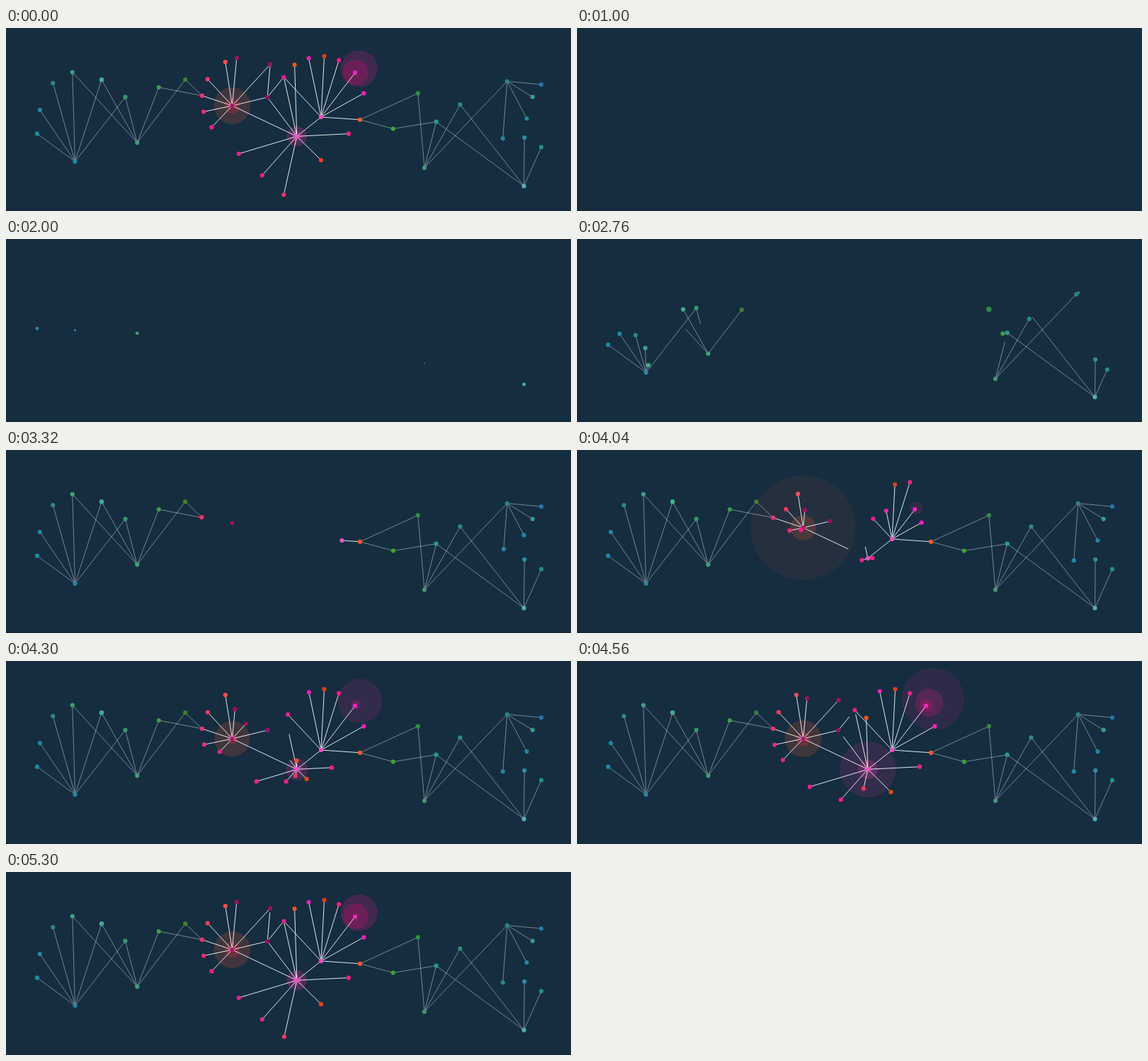
Write an HTML page with a canvas that moves like this. It is 798 px wide and 259 px high and loops after 5320 ms.

```html
<!DOCTYPE html>
<html lang="en">
<head>
<meta charset="utf-8">
<title>Growing network</title>
<style>
html, body { margin: 0; width: 100%; height: 100%; overflow: hidden; background: #152d3f; }
canvas { display: block; }
</style>
</head>
<body>
<canvas id="stage" width="798" height="259"></canvas>
<script>
const ctx = document.getElementById('stage').getContext('2d');
const LOOP = 5320, HOLD_END = 1000, GROW_START = 2000, STEP = 20;
const DOT = 3.1;
const FAINT = 'rgba(255,255,255,.42)', BRIGHT = 'rgba(255,255,255,.88)';

const clamp = v => Math.max(0, Math.min(1, v));
const smooth = p => p * p * (3 - 2 * p);
const easeOut = p => 1 - (1 - p) ** 2;
const bounce = p => 1 + 4.2 * (p - 1) ** 3 + 3.2 * (p - 1) ** 2;
const lerp = (a, b, k) => a + (b - a) * k;

const node = (x, y, color) => ({ x, y, color });

const L = {
  hubA: node(97.5, 189, '#2189a3'), hubB: node(185.3, 162.3, '#3f9f78'),
  a: node(44, 149.7, '#1f8aa0'), b: node(47.8, 116, '#22899a'),
  c: node(66.3, 78, '#2f8a80'), d: node(93.8, 62.6, '#3f9f80'),
  e: node(135, 73.2, '#3fae90'), f: node(168.5, 97.7, '#36986e'),
  g: node(215.8, 84, '#3f9a4c'), h: node(253.2, 73.2, '#3f7f36')
};
const M = {
  red: node(319.5, 110, '#b5106f'), pink: node(410.8, 153.3, '#f050c8'),
  top: node(445, 126, '#ee4fc0'), gate: node(277, 95.8, '#f5306a'),
  exit: node(500, 129.8, '#fb5a25'), a: node(284.7, 72.4, '#f5365f'),
  b: node(309.8, 48, '#fb4a55'), c: node(325.8, 42.3, '#a00f5f'),
  d: node(373.2, 51.4, '#a3105f'), e: node(369.2, 98, '#9c0d66'),
  f: node(279.2, 118.5, '#f02a72'), g: node(290.5, 140.4, '#f01f86'),
  h: node(392.3, 69.5, '#ee1c90'), i: node(407.6, 52, '#f5521f'),
  j: node(427.6, 42.8, '#ee22b4'), k: node(449.5, 39.8, '#e0400f'),
  l: node(470.2, 45.7, '#ef2080'), m: node(493, 63.4, '#f026c0'),
  n: node(505.3, 92.4, '#ee20b8'), o: node(484, 149.7, '#f01f85'),
  p: node(445, 187, '#ee4018'), q: node(392.3, 236, '#f03560'),
  r: node(361.8, 208.5, '#ee2090'), s: node(328.8, 178, '#f01f8c')
};
const R = {
  hubA: node(591, 197.8, '#4a9277'), hubB: node(731.5, 223.7, '#4fb0b4'),
  hubC: node(707.8, 75.5, '#27857e'), a: node(581.8, 92.4, '#2f8f40'),
  b: node(546.8, 142.6, '#3f9f3c'), c: node(607.6, 132.7, '#2a9a85'),
  d: node(641.4, 108.3, '#2a8f7a'), e: node(756, 80, '#2278a8'),
  f: node(743.7, 97.6, '#3c9c86'), g: node(735.4, 128, '#2287a0'),
  h: node(701.7, 156.3, '#2287a0'), i: node(732.2, 155, '#2a8fa0'),
  j: node(756, 168.7, '#24907a')
};

const lines = [], dots = [], rings = [];

// A line growing out of one node towards another.
function link(from, to, start, dur = 600, color = FAINT) {
  lines.push({ from, to, start, dur, color });
}
// The same, with the end dot riding on the tip.
function shoot(from, to, start, dur = 600, color = FAINT) {
  link(from, to, start, dur, color);
  dots.push({ from, to, start, dur, ease: smooth, grow: 0 });
}
// A dot falling into place while it grows.
function drop(to, rise, size, start = 1990, dur = 360, ease = smooth) {
  const from = { x: to.x, y: to.y - rise };
  dots.push({ from, to, start, dur, ease, grow: size });
}
// A ring that widens; with an end alpha it fades and then vanishes.
function ring(at, radius, start, dur, rgb, alpha, drift = 0, endAlpha = 0) {
  rings.push({ at, radius, start, dur, rgb, alpha, drift, endAlpha });
}

shoot(L.hubA, L.b, 2355);
shoot(L.hubA, L.c, 2469);
shoot(L.hubA, L.d, 2553);
shoot(L.hubA, L.e, 2649);
shoot(L.hubA, L.f, 2108);
link(L.hubA, L.a, 2150, 390);
shoot(L.hubB, L.e, 2376);
shoot(L.hubB, L.h, 2379);
shoot(L.hubB, L.g, 2770, 500);
link(L.hubB, L.d, 2520);
link(L.f, L.hubB, 2520);
shoot(L.h, M.gate, 2870, 500);
link(L.g, M.gate, 2870, 500);

shoot(R.hubA, R.d, 2244);
shoot(R.hubA, R.hubC, 2214);
link(R.hubA, R.c, 2331);
link(R.hubA, R.a, 2765, 450);
shoot(R.hubB, R.c, 2140);
shoot(R.hubB, R.i, 2345);
shoot(R.hubB, R.j, 2375);
link(R.hubB, R.d, 2208);
shoot(R.hubC, R.e, 2720, 580);
shoot(R.hubC, R.f, 2725, 580);
shoot(R.hubC, R.g, 2700, 815);
shoot(R.hubC, R.h, 2748, 800);
shoot(R.c, R.b, 2640);
shoot(R.a, M.exit, 2780, 500);
link(R.b, M.exit, 2800, 480);

const bright = (draw, from, to, start, dur) => draw(from, to, start, dur, BRIGHT);
bright(link, M.gate, M.red, 3400, 300);
bright(shoot, M.red, M.b, 3626);
bright(shoot, M.red, M.a, 3532, 800);
bright(shoot, M.red, M.c, 3413, 1530);
bright(shoot, M.red, M.d, 4056);
bright(shoot, M.red, M.e, 3632);
bright(shoot, M.red, M.f, 3749);
bright(shoot, M.red, M.g, 3900, 700);
bright(link, M.red, M.pink, 3659);
bright(shoot, M.exit, M.top, 3082, 500);
bright(shoot, M.top, M.pink, 3560, 450);
bright(shoot, M.top, M.l, 3500, 520);
bright(shoot, M.top, M.k, 3580, 575);
bright(shoot, M.top, M.j, 3748);
bright(shoot, M.top, M.m, 3671);
bright(shoot, M.top, M.n, 3662);
bright(shoot, M.top, M.h, 3585, 900);
bright(shoot, M.pink, M.i, 4170);
bright(shoot, M.pink, M.o, 3930);
bright(shoot, M.pink, M.p, 4038);
bright(shoot, M.pink, M.q, 3996, 1465);
bright(shoot, M.pink, M.r, 4004, 800);
bright(shoot, M.pink, M.s, 3920);
bright(link, M.pink, M.h, 3773, 937);
bright(link, M.pink, M.e, 4113);
bright(link, M.e, M.h, 4190);
bright(link, M.e, M.d, 4832);

drop(L.a, 23, .8);
drop(L.hubA, 60, .5);
drop(L.hubB, 29, .8);
drop(R.hubA, 22, .3);
drop(R.hubB, 18, .8);
drop(R.a, 26, .3, 2550, 430, bounce);
drop(M.red, 26, .3, 3255, 430, bounce);

const ORANGE = '220,85,50', CRIMSON = '225,40,65', PURPLE = '195,30,125', MAGENTA = '215,10,105', ROSE = '220,50,150';
ring(M.red, 75, 3600, 500, ORANGE, .25, 0, .06);
ring(M.red, 26, 3730, 700, ORANGE, .22);
ring(M.red, 11, 3950, 800, CRIMSON, .28);
ring(M.m, 47, 3960, 800, PURPLE, .2, .22, .12);
ring(M.m, 26, 4200, 700, PURPLE, .25, .22);
ring(M.m, 18, 4350, 700, MAGENTA, .28, .05);
ring(M.pink, 43, 4200, 500, ROSE, .25, 0, .11);
ring(M.pink, 14, 4150, 500, ROSE, .28);
ring(M.pink, 7, 4300, 500, ROSE, .35);

const progress = (item, t) => clamp((t - item.start) / item.dur);
const along = (item, k) => [lerp(item.from.x, item.to.x, k), lerp(item.from.y, item.to.y, k)];

function disc(x, y, radius, color) {
  ctx.fillStyle = color;
  ctx.beginPath();
  ctx.arc(x, y, Math.max(0, radius), 0, Math.PI * 2);
  ctx.fill();
}

function drawRing(item, t) {
  const p = progress(item, t);
  if (p <= 0 || (item.endAlpha && p >= 1)) return;
  const radius = item.radius * easeOut(p);
  const shift = item.drift * radius;
  const alpha = lerp(item.alpha, item.endAlpha || item.alpha, p);
  // Rings follow the dot they belong to.
  const rider = dots.find(dot => dot.to === item.at);
  const [x, y] = along(rider, rider.ease(progress(rider, t)));
  disc(x + shift, y - shift, radius, `rgba(${item.rgb},${alpha})`);
}

function drawLine(item, t) {
  const p = progress(item, t);
  if (p <= 0) return;
  ctx.strokeStyle = item.color;
  ctx.beginPath();
  ctx.moveTo(item.from.x, item.from.y);
  ctx.lineTo(...along(item, smooth(p)));
  ctx.stroke();
}

function drawDot(item, t) {
  const p = progress(item, t);
  if (p <= 0) return;
  const k = item.ease(p);
  const scale = item.grow ? lerp(item.grow, 1, k) : Math.min(1, p * 8);
  disc(...along(item, k), DOT * scale, item.to.color);
}

function draw(t) {
  ctx.fillStyle = '#152d3f';
  ctx.fillRect(0, 0, 798, 259);
  ctx.fillStyle = '#12273a';
  ctx.fillRect(0, 258, 798, 1);
  if (t >= HOLD_END && t < GROW_START) return;
  const at = t < HOLD_END ? Infinity : t;
  ctx.lineWidth = 1;
  rings.forEach(item => drawRing(item, at));
  lines.forEach(item => drawLine(item, at));
  // Later shots first, so hubs stay above the dots leaving them.
  for (let i = dots.length - 1; i >= 0; i--) drawDot(dots[i], at);
}

const begin = performance.now();
function tick() {
  const t = (performance.now() - begin) % LOOP;
  draw(Math.floor(t / STEP) * STEP);
  requestAnimationFrame(tick);
}
tick();
</script>
</body>
</html>
```
